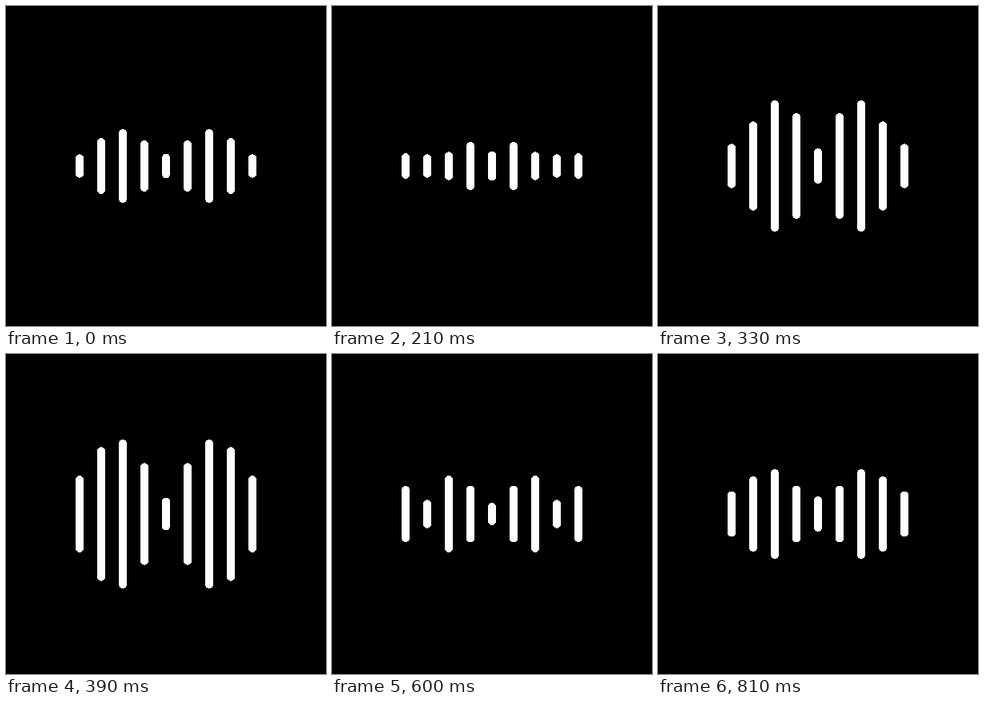
Write an HTML page that moves like this. It is 400 by 400 pixels and loops after 840 ms.

```html
<!DOCTYPE html>
<html lang="en">
<head>
<meta charset="utf-8">
<title>Sound bars</title>
<style>
  html, body { margin: 0; width: 100%; height: 100%; overflow: hidden; background: #000; }
  svg { display: block; width: 100%; height: 100%; }
</style>
</head>
<body>
<svg id="stage" viewBox="0 0 400 400" fill="#fff" shape-rendering="crispEdges"></svg>
<script>
const LOOP = 840, STEP = 30, MID = 200, GAP = 27, WIDTH = 10;

// Each bar swells and shrinks on its own beat, listed from the centre outwards.
const swells = [
  { at: -170, beat: 245, turns: [22, 13.5, 22, 13.5, 22] },
  { at: -10, beat: 180, turns: [32, 25, 67.5, 35.5] },
  { at: 25, beat: 175, turns: [46, 17, 94, 46, 56] },
  { at: -105, beat: 170, turns: [11, 46, 13, 85, 16, 47] },
  { at: -140, beat: 200, turns: [2, 18, 15.5, 60, 28.5] }
];

const clamp = (v, lo, hi) => Math.min(hi, Math.max(lo, v));
const ease = u => (1 - Math.cos(Math.PI * u)) / 2;

// Half height of a bar, eased from one turn to the next.
function reach({ at, beat, turns }, t) {
  const last = turns.length - 1;
  const pos = clamp((t - at) / beat, 0, last);
  const i = Math.min(Math.floor(pos), last - 1);
  return turns[i] + (turns[i + 1] - turns[i]) * ease(pos - i);
}

const stage = document.getElementById("stage");
const bars = Array.from({ length: 9 }, (_, i) => {
  const bar = document.createElementNS("http://www.w3.org/2000/svg", "rect");
  bar.setAttribute("x", MID + (i - 4) * GAP - WIDTH / 2);
  bar.setAttribute("width", WIDTH);
  bar.setAttribute("rx", WIDTH / 2);
  return stage.appendChild(bar);
});

function draw(ms) {
  const t = Math.floor((ms % LOOP) / STEP) * STEP;
  bars.forEach((bar, i) => {
    const half = reach(swells[Math.abs(i - 4)], t);
    bar.setAttribute("y", MID - half);
    bar.setAttribute("height", half * 2);
  });
}

const start = performance.now();
function tick() {
  draw(performance.now() - start);
  requestAnimationFrame(tick);
}
tick();
</script>
</body>
</html>
```
